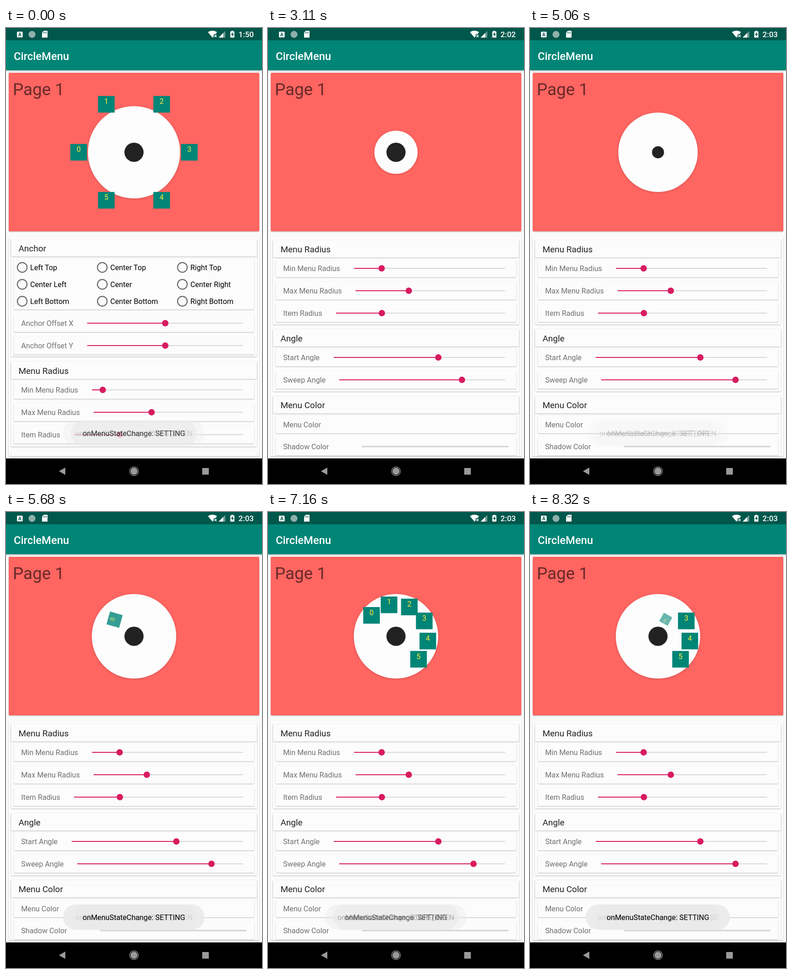
An HTML page that plays this animation: 561 by 998 pixels, repeating every 8.36 s.

```html
<!DOCTYPE html>
<html lang="en">
<head>
<meta charset="utf-8">
<title>CircleMenu</title>
<style>
  html, body { margin: 0; width: 100%; height: 100%; overflow: hidden; background: #fafafa; }
  svg { display: block; width: 561px; height: 998px; font: 16.2px Roboto, sans-serif; }
  .card { fill: #fcfcfc; filter: drop-shadow(0 1.4px 1px rgba(0, 0, 0, .27)); }
  .title { font-size: 19px; fill: #212121; }
  .label { fill: #707070; }
  .ring { fill: none; stroke: #686868; stroke-width: 2.2; }
  .track { stroke: #d8d8d8; stroke-width: 2; }
  .fill { stroke: #d81b60; stroke-width: 2.2; }
  .accent { fill: #d81b60; }
  .digit { fill: #ffeb3b; text-anchor: middle; }
  .toast text { text-anchor: middle; }
</style>
</head>
<body>
<svg id="stage" viewBox="0 0 561 998"></svg>
<script>
const LOOP = 8360;
const CUT = 60;                 // opening scene ends
const CENTER = [280.5, 272];
const OPEN = { start: 4925, jump: 5060, length: 480 };
const ITEM_TIME = 240;
const ITEMS_IN = 5510 + 40 - 4 * 0, ITEMS_OUT = 7784;
const stage = document.getElementById('stage');

function el(name, attrs, parent = stage, text) {
  const node = document.createElementNS('http://www.w3.org/2000/svg', name);
  set(node, attrs);
  if (text !== undefined) node.textContent = text;
  return parent.appendChild(node);
}
function set(node, attrs) {
  for (const key in attrs) node.setAttribute(key, attrs[key]);
}
const box = (x, y, width, height, attrs, parent) => el('rect', { x, y, width, height, ...attrs }, parent);
const disc = (cx, cy, r, attrs, parent) => el('circle', { cx, cy, r, ...attrs }, parent);
const path = (d, attrs, parent) => el('path', { d, ...attrs }, parent);
const label = (x, y, text, attrs, parent) => el('text', { x, y, ...attrs }, parent, text);
const card = (x, y, w, h, parent) => box(x, y, w, h, { rx: 2, class: 'card' }, parent);

const clamp = x => Math.min(1, Math.max(0, x));
const easeOut = x => 1 - (1 - clamp(x)) ** 2;
const overshoot = x => { const u = clamp(x) - 1; return u * u * (2.7 * u + 1.7) + 1; };

function slider(parent, x, y, value) {
  el('line', { x1: x, x2: 519.5, y1: y, y2: y, class: 'track' }, parent);
  const bar = el('line', { x1: x, y1: y, y2: y, class: 'fill' }, parent);
  const halo = disc(value, y, 0, { class: 'accent' }, parent);
  const thumb = disc(value, y, 7, { class: 'accent' }, parent);
  const move = (v, age = -1) => {
    const pressed = age >= 0 && age < 870;
    const hold = clamp((870 - age) / 450);
    set(bar, { x2: v });
    set(thumb, { cx: v, r: pressed ? 7 + 2 * easeOut(age / 150) * hold : 7 });
    set(halo, { cx: v, r: pressed ? 7 + 12 * easeOut(age / 250) : 0, opacity: .25 * hold });
  };
  move(value);
  return move;
}
function row(parent, y, text, x, value) {
  card(17, y - 20, 527, 39.5, parent);
  label(33.2, y + 6.3, text, { class: 'label' }, parent);
  return value && slider(parent, x, y, value);
}
function section(parent, y, height, text) {
  card(11, y, 539, height, parent);
  card(11, y, 539, 38, parent);
  label(27.4, y + 26.7, text, { class: 'title' }, parent);
}

// App chrome
box(0, 0, 561, 998, { fill: '#fafafa' });
box(0, 27, 561, 65.5, { fill: '#008577', style: 'filter:drop-shadow(0 1.5px 2px rgba(0,0,0,.3))' });
box(0, 0, 561, 27, { fill: '#00574b' });
label(17, 69.5, 'CircleMenu', { fill: '#fff', 'font-size': 23.8, 'font-weight': 500 });
box(24, 8, 12.5, 12.5, { rx: 1.5, fill: '#fff' });
label(30.2, 18, 'A', { fill: '#00574b', 'font-size': 10.5, 'font-weight': 700, 'text-anchor': 'middle' });
disc(57, 14, 7, { fill: '#8fb0aa', stroke: '#a9c2bd' });
path('M83 6H91V21H79V10Z', { fill: '#fff' });
path('M82 9v3M85 9v3M88 9v3', { stroke: '#00574b', 'stroke-width': 1.3 });
path('M442.5 9Q452.5 2.5 462.5 9L459 13.5H455V18.5L452.5 21Z', { fill: '#fff' });
path('M456.5 15l5 5m0-5l-5 5', { stroke: '#fff', 'stroke-width': 1.5 });
path('M466 21L480.5 6.5V21Z', { fill: '#6f9d95' });
path('M466 21L476 11V21Z', { fill: '#fff' });
path('M491.5 7.5H494V6H498V7.5H500.5V21H491.5Z', { fill: '#fff' });
path('M497 9l-4 6h2.6v4l3.8-6h-2.4Z', { fill: '#00574b' });
const clock = label(509.5, 20, '', { fill: '#fff', 'font-size': 17, 'font-weight': 500 });

// Page with the circle menu
box(6, 98, 549, 347, { rx: 2.5, fill: '#ff6561', style: 'filter:drop-shadow(0 1.3px 1.2px rgba(0,0,0,.3))' });
label(15, 147, 'Page 1', { 'font-size': 36.8, fill: '#692a29' });
const plate = disc(...CENTER, 47.5, { fill: '#fdfdfd', style: 'filter:drop-shadow(0 1px 2px rgba(0,0,0,.2))' });
const icon = disc(...CENTER, 21, { fill: '#222' });
const items = [0, 1, 2, 3, 4, 5].map(n => {
  const g = el('g', {});
  box(-18.2, -18.2, 36.4, 36.4, { fill: '#008577' }, g);
  label(0, -.7, n, { class: 'digit' }, g);
  return g;
});

// Settings list, in two scroll states
card(6, 457, 549, 480);
el('rect', { x: 6, y: 457, width: 549, height: 480 }, el('clipPath', { id: 'list' }));
const list = el('g', { 'clip-path': 'url(#list)' });
const first = el('g', {}, list), second = el('g', {}, list);

section(first, 462, 257, 'Anchor');
card(17, 504, 527, 112, first);
['Left Top', 'Center Top', 'Right Top', 'Center Left', 'Center', 'Center Right',
 'Left Bottom', 'Center Bottom', 'Right Bottom'].forEach((text, i) => {
  const x = 35.5 + 175.5 * (i % 3), y = 524 + 37 * Math.floor(i / 3);
  disc(x, y, 10.6, { class: 'ring' }, first);
  label(x + 17.5, y + 6, text, {}, first);
});
row(first, 646, 'Anchor Offset X', 178, 349);
row(first, 695, 'Anchor Offset Y', 178, 349);
section(first, 730, 186, 'Menu Radius');
row(first, 792, 'Min Menu Radius', 188.5, 212);
row(first, 841, 'Max Menu Radius', 192, 319);
row(first, 890, 'Item Radius', 149, 249);
card(11, 926, 539, 40, first);

section(second, 464, 185, 'Menu Radius');
row(second, 526, 'Min Menu Radius', 188.5, 249);
row(second, 575, 'Max Menu Radius', 192, 308.5);
row(second, 624, 'Item Radius', 149, 249.5);
section(second, 659, 136.5, 'Angle');
const startAngle = row(second, 721, 'Start Angle', 144, 361);
const sweepAngle = row(second, 770, 'Sweep Angle', 156, 425);
section(second, 805.5, 160, 'Menu Color');
row(second, 867.5, 'Menu Color');
row(second, 916, 'Shadow Color');
box(206, 914.5, 321, 3, { fill: '#d3d3d3' }, second);

// Navigation bar
box(0, 942, 561, 56, { fill: '#000' });
path('M116 970L130 962V978Z', { fill: '#9a9a9a' });
disc(280.5, 970, 7.7, { fill: '#9a9a9a' });
disc(280.5, 970, 9.7, { fill: 'none', stroke: '#9a9a9a', 'stroke-width': 1.3 });
box(430, 963, 14.5, 14.5, { fill: '#9a9a9a' });

function toast(state, width) {
  const g = el('g', { class: 'toast' });
  box(280 - width / 2, 859, width, 55.5, { rx: 27.7, fill: '#eaeaea', 'fill-opacity': .9 }, g);
  label(280.3, 893, 'onMenuStateChange: ' + state, {}, g);
  return g;
}
const opened = toast('OPENED', 274);
const startOpen = toast('START_OPEN', 310);
const startClose = toast('START_CLOSE', 316);
const setting = toast('SETTING', 276);

const fade = (t, start) => easeOut((t - start) / 500);
const alpha = (node, value) => set(node, { opacity: value });

function placeItem(node, angle, distance, p) {
  const a = angle * Math.PI / 180;
  const x = CENTER[0] + Math.cos(a) * distance * p;
  const y = CENTER[1] + Math.sin(a) * distance * p;
  set(node, { opacity: p, transform: `translate(${x} ${y}) rotate(${360 * p}) scale(${p})` });
}

function drawOpening() {
  clock.textContent = '1:50';
  set(plate, { r: 101 });
  set(icon, { r: 21 });
  items.forEach((node, i) => placeItem(node, 180 + 60 * i, 121.3, 1));
  alpha(opened, 0);
  alpha(startClose, 0);
  alpha(startOpen, .4);
  alpha(setting, .75);
}

function drawMain(t) {
  clock.textContent = t < 4100 ? '2:02' : '2:03';
  startAngle(t < 2240 ? 361 : 373.3, t - 2240);
  sweepAngle(t < 3690 ? 425 : 450.3, t - 3690);

  const p = t < OPEN.jump ? 0 : clamp((t - OPEN.start) / OPEN.length);
  set(plate, { r: 47.3 + 45.2 * overshoot(p) });
  set(icon, { r: 21 * Math.abs(Math.cos(Math.PI * p)) });

  items.forEach((node, i) => {
    const shown = easeOut((t - ITEMS_IN - ITEM_TIME * i) / ITEM_TIME);
    const hidden = easeOut((t - ITEMS_OUT - ITEM_TIME * i) / ITEM_TIME);
    placeItem(node, 220.5 + 37 * i, 70.5, shown - hidden);
  });

  const opening = t < 5060 ? 0 : fade(t, 5015) - fade(t, 7000);
  const closing = t < 7820 ? 0 : 1;
  alpha(startOpen, opening);
  alpha(opened, fade(t, 7000) - closing * fade(t, 7790));
  alpha(startClose, closing * fade(t, 7785));
  alpha(setting, opening + closing * fade(t, 7820));
}

function frame() {
  const t = performance.now() % LOOP;
  const early = t < CUT;
  first.style.display = early ? '' : 'none';
  second.style.display = early ? 'none' : '';
  early ? drawOpening() : drawMain(t);
  requestAnimationFrame(frame);
}
frame();
</script>
</body>
</html>
```
